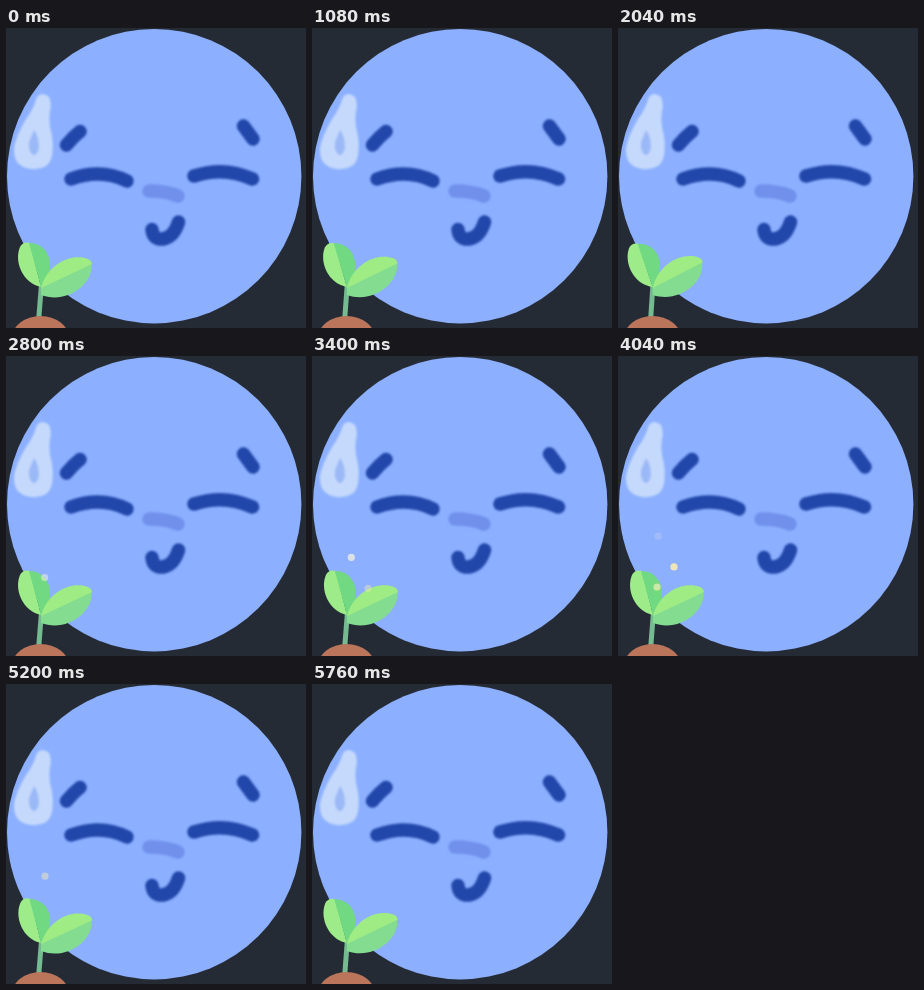
These frames come from a looping animation (300 by 300 pixels, 5.8 s). An HTML page:

```html
<!DOCTYPE html>
<html lang="en">
<head>
<meta charset="utf-8">
<title>Sprout and face</title>
<style>
  html, body { margin: 0; width: 100%; height: 100%; overflow: hidden; background: #252b35; }
  svg { display: block; width: 100vw; height: 100vh; }
  .line { fill: none; stroke: #2447aa; stroke-width: 13.5; stroke-linecap: round; stroke-linejoin: round; }
</style>
</head>
<body>
<svg viewBox="0 0 300 300">
  <defs>
    <filter id="soft" x="-10%" y="-10%" width="120%" height="120%"><feGaussianBlur stdDeviation="1.1"/></filter>
  </defs>
  <circle cx="148.2" cy="148.2" r="147.2" fill="#8cb0ff"/>
  <g filter="url(#soft)">
    <path fill="#c5d9fc" d="M31 69Q36 63 43 69Q46 75 44 84Q42 94 46 108Q49 132 40 138Q30 144 17 139Q7 134 8 120Q10 108 20 91Q27 82 31 69Z"/>
    <path fill="#9bb9f6" d="M28 102Q33 108 33 120Q31 128 27 127Q22 124 23 114Z"/>
    <g class="line">
      <path d="M60.5 117Q67 109 74 103.5"/>
      <path d="M237.5 98L247 111"/>
      <path d="M65 151Q95 140 121 153"/>
      <path d="M188 148Q218 138 246.5 151"/>
      <path d="M146 201.5Q147 212 157 211Q168 209 172.5 194"/>
      <path stroke="#7090eb" d="M143 163Q160 163 172 168"/>
    </g>
  </g>
  <g id="sprout">
    <path fill="none" stroke="#75ba91" stroke-width="5" d="M32 300L35.5 256"/>
    <g id="left">
      <path fill="#9eec89" d="M35 259C16 255 8 233 14 219Q17 213 24 215Z"/>
      <path fill="#70d982" d="M23 215C43 215 52 239 35 259Z"/>
    </g>
    <g id="right">
      <path fill="#84dc91" d="M35 259L85 233C90 254 62 277 35 267Z"/>
      <path fill="#9eec83" d="M35 260C42 235 66 225 82 231Q85 232 86 236Z"/>
    </g>
  </g>
  <ellipse cx="34.5" cy="310" rx="28.5" ry="22" fill="#ba755a"/>
  <g id="sparks" fill="#fff0ae"></g>
</svg>
<script>
const LOOP = 5800, STEP = 40, RISE = 0.0335;
const byId = id => document.getElementById(id);

// Time and lean in degrees; a gentle sway follows the last key.
const lean = [[920, 0], [1200, -1.8], [1540, 3], [2100, -3], [2800, 0]];
const sparks = [
  { x: 38.5, drift: 0.0012, y: 224.9, born: 2700, color: '#fff8db' },
  { x: 56, drift: 0, y: 235, born: 3320 },
  { x: 39, drift: 0, y: 235.7, born: 3900 }
];

for (const s of sparks) {
  s.dot = document.createElementNS('http://www.w3.org/2000/svg', 'circle');
  s.dot.setAttribute('r', 3.6);
  if (s.color) s.dot.setAttribute('fill', s.color);
  byId('sparks').append(s.dot);
}

const clamp = v => Math.max(0, Math.min(1, v));
const turn = (id, angle, x, y) =>
  byId(id).setAttribute('transform', `rotate(${angle} ${x} ${y})`);

function angleAt(t) {
  if (t < lean[0][0]) return 0;
  const i = lean.findIndex(k => t < k[0]);
  if (i < 0) return -Math.sin((t - 2800) / 1240 * 2 * Math.PI);
  const [t0, a] = lean[i - 1], [t1, b] = lean[i];
  return a + (b - a) * (1 - Math.cos(Math.PI * (t - t0) / (t1 - t0))) / 2;
}

function draw(now) {
  const t = Math.floor(now % LOOP / STEP) * STEP;
  const angle = angleAt(t);
  turn('sprout', angle * 0.25, 34, 295);
  turn('left', angle * 1.1, 35, 259);
  turn('right', angle * 0.45, 35, 259);
  for (const s of sparks) {
    const age = t - s.born, y = s.y - RISE * age;
    s.dot.setAttribute('cx', s.x + s.drift * age);
    s.dot.setAttribute('cy', y);
    s.dot.setAttribute('opacity', 0.85 * clamp(age / 180) * clamp((y - 173) / 36) * (y > 176));
  }
}

const start = performance.now();
function tick() {
  draw(performance.now() - start);
  requestAnimationFrame(tick);
}
tick();
</script>
</body>
</html>
```
